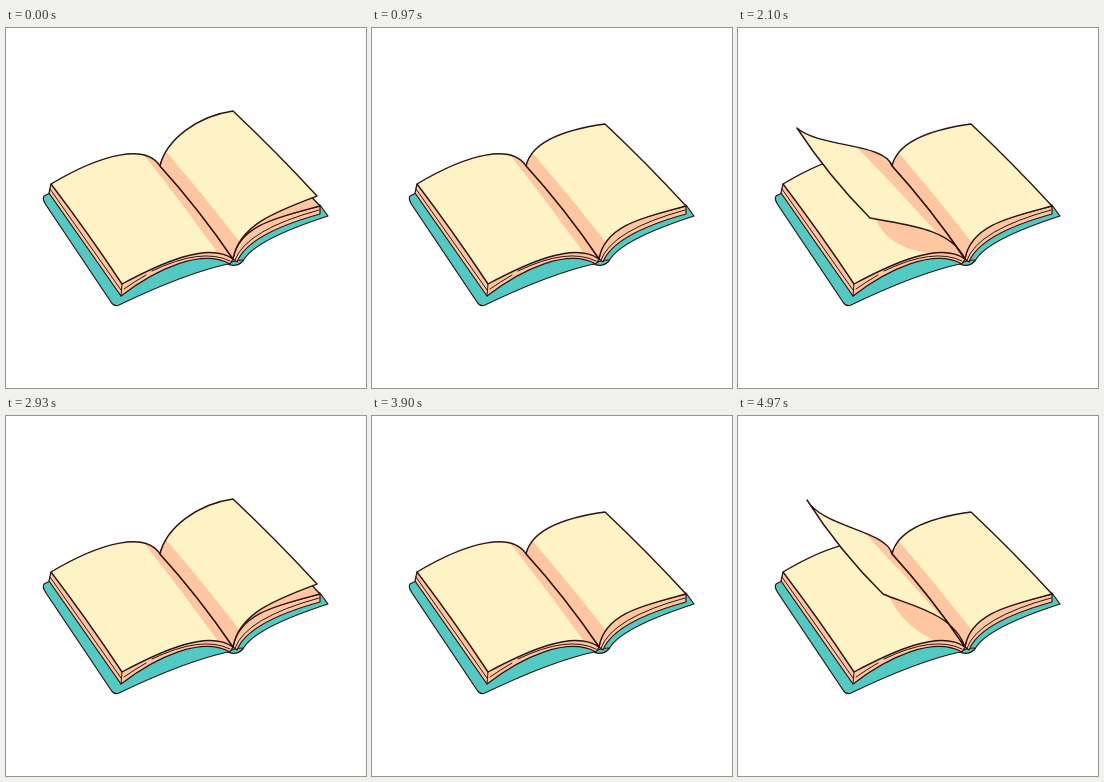
An HTML page with a canvas that plays this animation: 360x360 px, repeating every 5.03 s.

```html
<!DOCTYPE html>
<html lang="en">
<head>
<meta charset="utf-8">
<title>Turning pages</title>
<style>
html, body { margin: 0; width: 100%; height: 100%; overflow: hidden; background: #fff; }
canvas { display: block; }
</style>
</head>
<body>
<canvas id="stage" width="360" height="360"></canvas>
<script>
const ctx = document.getElementById('stage').getContext('2d');
const LOOP = 5030, CREAM = '#fdf3c4', PEACH = '#fec6a1', TEAL = '#52c9c2', INK = '#2e1212';
const TOP = [154, 138], FOOT = [227, 231], SPINE_BEND = [193, 181];
const TURN = 12, CYCLE = 18;

// Where the far and near corners of a page pass: step, far x, y, near x, y
const PATH = [
  [-1, 233, 96, 314, 178],
  [0, 227, 83, 311, 168],
  [3, 173, 41, 262, 116],
  [4, 144, 37, 222, 111],
  [7, 69, 84, 145, 178],
  [8, 59, 100, 132, 190],
  [TURN, 45, 156, 116, 256]
];

const add = (p, x, y) => [p[0] + x, p[1] + y];
const mix = (p, q, t) => p.map((v, i) => v + (q[i] - v) * t);

// Slope of the corner path at a key point
function slope(i, j) {
  const a = PATH[Math.max(i - 1, 0)], b = PATH[Math.min(i + 1, PATH.length - 1)];
  return (b[j] - a[j]) / (b[0] - a[0]);
}

// Smooth path through the key points
function corners(step) {
  let i = 0;
  while (i < PATH.length - 2 && PATH[i + 1][0] <= step) i++;
  const p = PATH[i], q = PATH[i + 1], h = q[0] - p[0], u = (step - p[0]) / h;
  const at = j => p[j] + (q[j] - p[j]) * u * u * (3 - 2 * u)
    + h * u * (1 - u) * ((1 - u) * slope(i, j) - u * slope(i + 1, j));
  return { far: [at(1), at(2)], near: [at(3), at(4)] };
}

function bezier(t, a, b, c, d) {
  const ab = mix(a, b, t), bc = mix(b, c, t), cd = mix(c, d, t);
  return mix(mix(ab, bc, t), mix(bc, cd, t), t);
}

function draw(path, fill, line, width = 1.4) {
  const shape = path instanceof Path2D ? path : new Path2D(path);
  if (fill) { ctx.fillStyle = fill; ctx.fill(shape); }
  if (line) { ctx.strokeStyle = line; ctx.lineWidth = width; ctx.stroke(shape); }
}

// The paper leaves the spine at an angle that swings over with the turn
function page(step, shadow) {
  const { far, near } = corners(step);
  const u = Math.max(step, 0) / TURN, lift = Math.sin(Math.PI * u);
  const farEdge = [add(TOP, 6 - 20 * u, -26 + 4 * u), add(far, -36 + 88 * u, 5 - 36 * u + 45 * lift), far];
  const nearEdge = [add(FOOT, 6 - 31 * u, -34 + 16 * u - 10 * lift), add(mix(near, FOOT, .4), -7, -10), near];
  const bend = add(mix(far, near, .5), 1 - 7 * lift, 6 * lift - 2);
  const outline = new Path2D(
    `M${TOP}C${farEdge}Q${bend} ${near}C${nearEdge[1]} ${nearEdge[0]} ${FOOT}Q${SPINE_BEND} ${TOP}Z`);

  const shade = .19 + .06 * u + .22 * Math.sin(Math.PI * u * u) ** 2;
  const a = bezier(shade, TOP, ...farEdge), b = bezier(shade * (1 - .3 * u), FOOT, ...nearEdge);
  const rim = bezier(shade / 2, TOP, ...farEdge);

  draw(outline, CREAM);
  ctx.save();
  ctx.clip(outline);
  draw(`M${TOP}L${rim}L${a}Q${add(mix(a, b, .5), 1, -1)} ${b}L${FOOT}Q${SPINE_BEND} ${TOP}Z`, PEACH);
  if (shadow) draw(shadow, PEACH);
  ctx.restore();
  draw(outline, null, INK);
}

function shadowRight(step) {
  const d = 3 - step, x = 288 + 31 * d, y = 144 + 8 * d;
  return `M${FOOT}L233 213Q${x / 4 + 174} ${166 + 11 * d} ${x} ${y}Q${x} ${y - 14} 222 100Z`;
}

function shadowLeft(step) {
  const { near } = corners(step);
  return `M${add(near, 6, 2)}Q${add(near, 20, 33)} 200 226L${FOOT}L200 195Z`;
}

function cover() {
  draw('M44 165L38 168Q36 171 40 177L105 274Q108 279 113 277Q180 245 222 236' +
    'Q230 240 237 233Q248 212 322 188L314 177L154 150Z', TEAL, INK, 1.2);
  draw('M222 236Q228 232 237 232', null, INK, 1.1);
  draw(`M45 156L43 165L115 268C150 241 196 220 224 236L${FOOT}L${TOP}Z`, PEACH, INK, 1.2);
  draw(`M314 178V186Q242 206 231 234L${FOOT}L234 200Z`, PEACH, INK, 1.2);
  draw('M44 161L115 262M116 256L115 268M118 261Q128 254 140 247' +
    'M146 243Q196 219 224 233M313 182Q240 202 229 232', null, INK, 1);
}

function render(time) {
  // Drawings are held on a 30 Hz grid
  const tick = Math.floor((Math.floor(time / 10) * 10 + 4) / (100 / 3));
  const step = (Math.ceil((tick + .2) / 2.43) - 1) % CYCLE;
  const turning = step < TURN;
  ctx.fillStyle = '#fff';
  ctx.fillRect(0, 0, 360, 360);
  ctx.lineJoin = ctx.lineCap = 'round';
  cover();
  page(-1, turning && step < 6 && shadowRight(step));
  page(TURN, turning && step > 5 && shadowLeft(step));
  if (turning) page(step);
}

const start = performance.now();
function frame() {
  render((performance.now() - start) % LOOP);
  requestAnimationFrame(frame);
}
frame();
</script>
</body>
</html>
```
